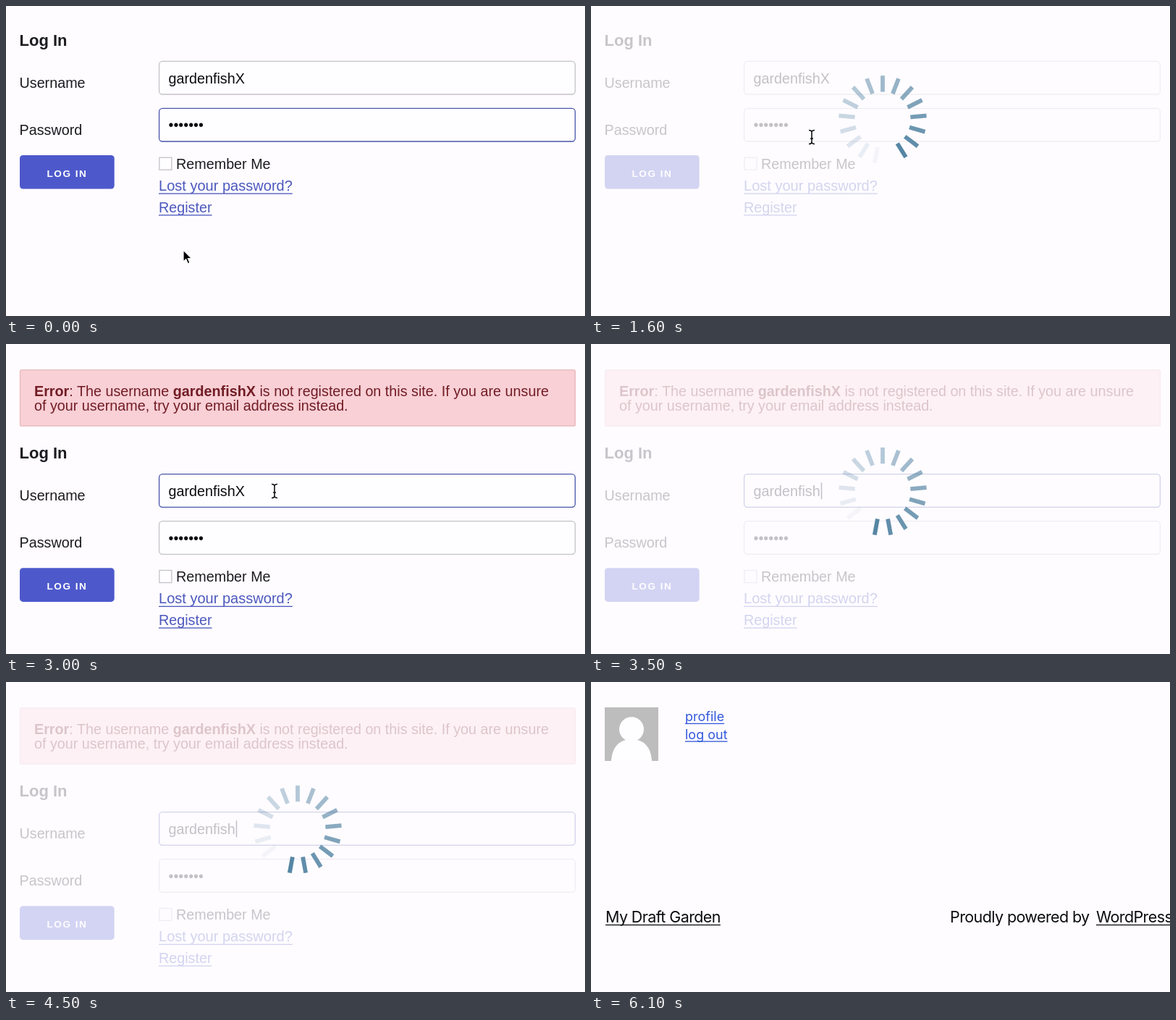
An HTML page for the animation above (6.6 s loop, 800 by 428 pixels).

```html
<!DOCTYPE html>
<html lang="en">
<head>
<meta charset="utf-8">
<title>Log In</title>
<style>
  html, body { margin: 0; width: 100%; height: 100%; overflow: hidden; background: #fefcff; }
  svg { display: block; width: 100%; height: 100%; }
  text { font-family: "Liberation Sans", Arial, sans-serif; font-size: 19.75px; fill: #1c1c20; white-space: pre; }
  .bold { font-weight: bold; }
  .title { font-size: 22px; font-weight: bold; }
  .input { fill: #0c0c0e; }
  .link { fill: #4c58bd; }
  .wide { font-size: 20.05px; }
  .button { font-size: 13.6px; font-weight: bold; letter-spacing: 1.5px; fill: #fff; }
  .error { fill: #721c24; }
  .success { fill: #0a3622; font-size: 19.95px; }
  .menu { font-family: Inter, sans-serif; font-size: 18px; fill: #3358dc; }
  .footer { font-family: Inter, sans-serif; font-size: 21.5px; letter-spacing: -.6px; fill: #0c0c0e; }
</style>
</head>
<body>
<svg id="stage" viewBox="0 0 800 428" xmlns="http://www.w3.org/2000/svg"></svg>
<script>
const LOOP = 6600, STEP = 100, SPOKES = 17;
const FADED = 0.24;
const USER = "gardenfish";
const stage = document.getElementById("stage");

function add(parent, tag, attrs, content) {
  const node = document.createElementNS("http://www.w3.org/2000/svg", tag);
  for (const key in attrs) node.setAttribute(key, attrs[key]);
  if (content) node.textContent = content;
  parent.appendChild(node);
  return node;
}

const group = parent => add(parent, "g", {});
const label = (parent, x, y, cls, str) => add(parent, "text", { x, y, class: cls }, str);
const box = (parent, x, y, width, height, rx, fill, stroke) =>
  add(parent, "rect", { x, y, width, height, rx, fill, stroke: stroke || "none", "stroke-width": 1.3 });
const show = (node, on) => node.setAttribute("display", on ? "inline" : "none");
const move = (node, x, y) => node.setAttribute("transform", `translate(${x} ${y})`);

function link(parent, x, y, cls, str, gap, color) {
  const node = label(parent, x, y, cls, str);
  add(parent, "rect", { x, y: y + gap, width: node.getComputedTextLength(), height: 1.3, fill: color });
}

// Login page
const login = group(stage);
const page = group(login);

const error = group(page);
box(error, 19.5, 35.8, 767, 77.4, 2, "#f8d0d6", "#e8b9bb");
const message = label(error, 39, 72, "error");
add(message, "tspan", { class: "bold" }, "Error");
add(message, "tspan", {}, ": The username ");
add(message, "tspan", { class: "bold" }, USER + "X");
add(message, "tspan", {}, " is not registered on this site. If you are unsure");
label(error, 39, 92, "error", "of your username, try your email address instead.");

const success = group(page);
box(success, 19.5, 35.8, 767, 58, 2, "#cce2d7", "#a5d2bd");
label(success, 39, 72, "success", "Login successful, updating...");

const form = group(page);
label(form, 18.5, 54.5, "title", "Log In");
label(form, 18.5, 112.5, "", "Username");
label(form, 18.5, 177.7, "", "Password");
const userBox = box(form, 211.6, 76.4, 574.8, 45.6, 4.5, "#fefdff");
const passBox = box(form, 211.6, 141.4, 574.8, 45.6, 4.5, "#fefdff");
const userText = label(form, 224.5, 107, "input", USER);
const nameWidth = userText.getComputedTextLength();
label(form, 224.5, 171.3, "input", "•".repeat(7));
const caret = box(form, 224.5 + nameWidth + 1, 88, 1.5, 23, 0, "#0c0c0e");
const button = box(form, 19, 206, 130.7, 46.6, 4.5, "#4d59cb");
label(form, 56.5, 235.6, "button", "LOG IN");
box(form, 211.9, 209.2, 17, 17, 0, "#fefdff", "#c3c2c7");
label(form, 235, 224.6, "", "Remember Me");
link(form, 211, 255, "link wide", "Lost your password?", 3.4, "#4c58bd");
link(form, 211, 284.7, "link", "Register", 3.4, "#4c58bd");

// Spinner
const spinner = group(login);
const spokes = Array.from({ length: SPOKES }, (_, i) =>
  add(spinner, "rect", {
    x: -2.9, y: -60.8, width: 5.8, height: 22.3, fill: "#4d7f9f",
    transform: `rotate(${i * 360 / SPOKES})`
  }));

// Pointers, each with its hot spot at the group's zero point
const pointer = group(login);
const arrow = group(pointer);
const hand = group(pointer);
const beam = group(pointer);
add(arrow, "path", {
  d: "M0 0V16L3.7 12.6 6.3 18.8 9 17.6 6.4 11.6H11.5Z",
  fill: "#000", stroke: "#fff", "stroke-width": 1.2
});
add(hand, "path", {
  d: "M-1.5 1.2Q-.6-.6 1 1L4 8Q5 6 7 7.2 8.6 5.8 10 7.4 12.2 6.4 13 9L14 14Q13.8 17 12 20H4.6L-1.6 13.5Q-4.4 11.3-3 9.8-1.5 9 1.2 11.4Z",
  fill: "#fff", stroke: "#111", "stroke-width": 1.4, "stroke-linejoin": "round"
});
add(hand, "path", { d: "M6 13l1 4M8.6 12.5l.8 4.3M11 12l.6 4", stroke: "#111", "stroke-width": 1, fill: "none" });
for (const [color, width] of [["#fff", 3.4], ["#111", 1.6]])
  add(beam, "path", {
    d: "M-4-9.5Q0-9.5 0-6.5Q0-9.5 4-9.5M0-6.5V6.5M-4 9.5Q0 9.5 0 6.5Q0 9.5 4 9.5M-2 2H2",
    fill: "none", stroke: color, "stroke-width": width
  });

// Page after login
const home = group(stage);
box(home, 19, 35, 74, 74, 0, "#bdbdbd");
add(home, "circle", { cx: 56, cy: 65.3, r: 17, fill: "#fefdff" });
add(home, "path", { d: "M28 109C29 90 39 79 56 79S83 90 84 109Z", fill: "#fefdff" });
link(home, 130, 53.6, "menu", "profile", 3.2, "#3358dc");
link(home, 130, 78.6, "menu", "log out", 2.8, "#3358dc");
link(home, 20, 331.8, "footer", "My Draft Garden", 3, "#0c0c0e");
label(home, 496, 331.8, "footer", "Proudly powered by");
link(home, 698, 331.8, "footer", "WordPress", 3, "#0c0c0e");

const path = [
  [0, 245, 337], [100, 245, 337], [500, 102, 213], [1200, 102, 213],
  [1600, 305, 181], [2200, 305, 181], [2600, 371, 203], [LOOP, 371, 203]
];

function pointerAt(t) {
  const i = path.findIndex(p => p[0] > t);
  const [t0, x0, y0] = path[i - 1], [t1, x1, y1] = path[i];
  const k = (t - t0) / (t1 - t0), e = k * k * (3 - 2 * k);
  return [x0 + (x1 - x0) * e, y0 + (y1 - y0) * e];
}

function render(t) {
  const done = t >= 5600;
  show(login, !done);
  show(home, done);
  if (done) return;

  const failed = t >= 1900 && t < 4600, passed = t >= 4600;
  const shift = passed ? 83.5 : failed ? 103.3 : 0;
  const first = t >= 600 && t < 1900, second = t >= 3400 && t < 4600;
  const busy = first || second;
  const starting = t === 600 || t === 3400;
  show(error, failed);
  show(success, passed);
  move(form, 0, shift);
  page.setAttribute("opacity", !busy ? 1 : starting ? 0.6 : FADED);

  const focus = t < 500 ? passBox : t >= 2500 ? userBox : null;
  for (const field of [userBox, passBox])
    field.setAttribute("stroke", field === focus ? "#4a56a8" : "#c3c2c7");
  userText.textContent = USER + (t < 3200 ? "X" : "");
  const typing = t >= 3200 && t < 3500;
  show(caret, t >= 3200 && (typing || t % 1000 >= 500));

  show(spinner, busy);
  move(spinner, 403, second ? 203.7 : 157);
  const head = Math.round(t * SPOKES / 1000 + (second ? 0.5 : -3.2));
  spokes.forEach((spoke, i) => {
    const lag = ((head - i) % SPOKES + SPOKES) % SPOKES;
    spoke.setAttribute("opacity", 0.95 * (1 - lag / (SPOKES - 1)));
  });

  const [x, y] = pointerAt(t);
  const over = (left, top, right, bottom) => x > left && x < right && y - shift > top && y - shift < bottom;
  const onButton = over(19, 206, 150, 253);
  const onField = over(211, 76, 787, 122.5) || over(211, 141, 787, 187.5);
  show(pointer, t < 3100);
  move(pointer, x, y);
  show(hand, onButton);
  show(beam, onField);
  show(arrow, !onButton && !onField);
  button.setAttribute("fill", onButton ? "#3a47a6" : "#4d59cb");
}

const start = performance.now();
function tick() {
  const t = (performance.now() - start) % LOOP;
  render(Math.floor(t / STEP) * STEP);
  requestAnimationFrame(tick);
}
tick();
</script>
</body>
</html>
```
